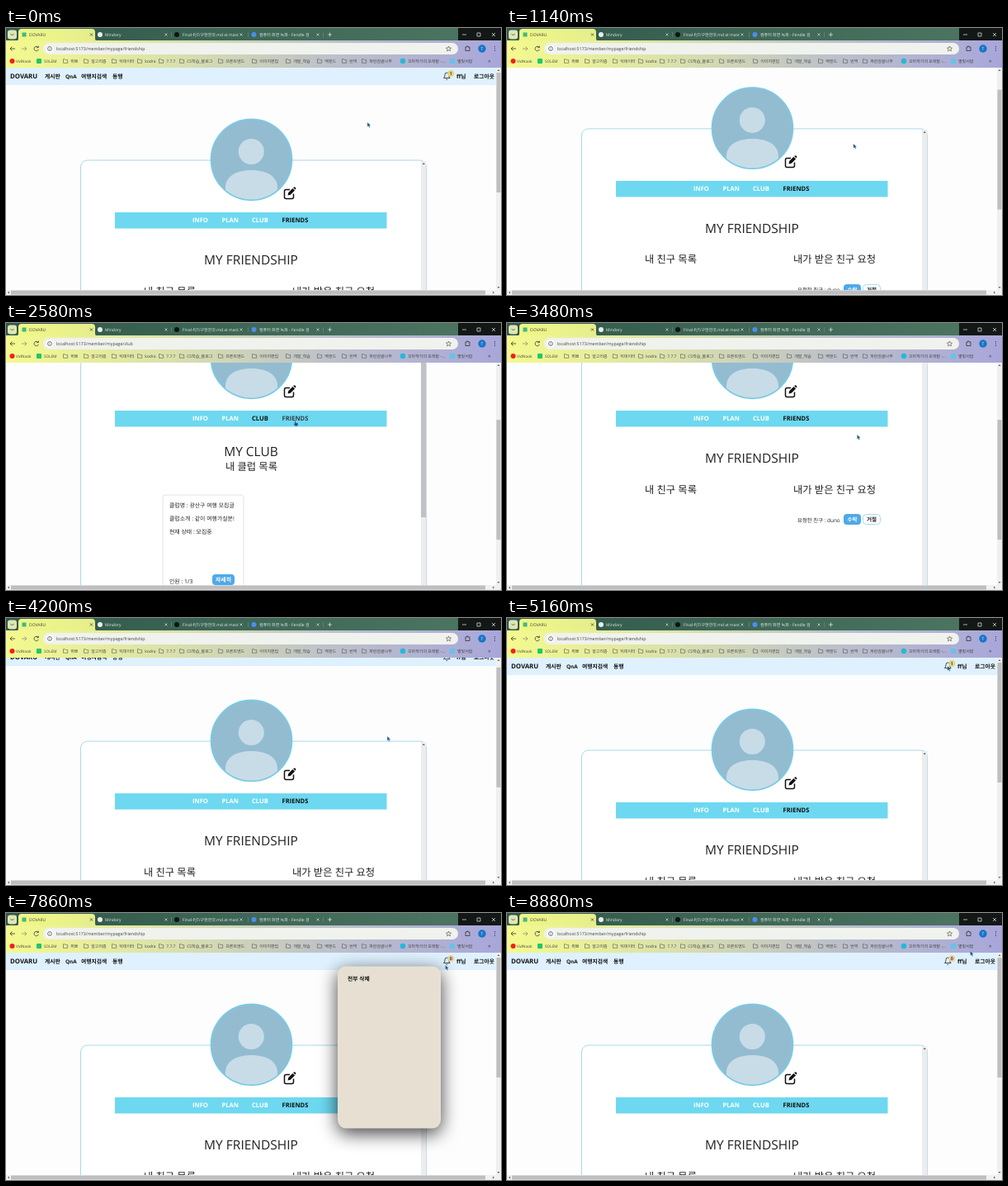
Animation, 600 px wide and 323 px high, one loop 8940 ms. Source, as an HTML page:

```html
<!DOCTYPE html>
<html lang="ko">
<head>
<meta charset="utf-8">
<style>
html, body { margin: 0; width: 100%; height: 100%; overflow: hidden; background: #fdfdfe; }
svg { display: block; width: 600px; height: 323px; }
text {
  font-family: "Open Sans", "Noto Sans CJK KR", "Noto Sans CJK JP", sans-serif;
  white-space: pre;
  text-rendering: geometricPrecision;
}
#panel rect { filter: drop-shadow(0 6px 11px rgba(0, 0, 0, .75)); }
</style>
</head>
<body>
<svg id="stage" viewBox="0 0 600 323"></svg>
<script>
const LOOP = 8940;
const $ = id => document.getElementById(id);

const text = (x, y, size, str, fill = '#222', weight = 400, extra = '') =>
  `<text x="${x}" y="${y}" font-size="${size}" fill="${fill}" font-weight="${weight}" ${extra}>${str}</text>`;
const rect = (x, y, w, h, fill, rx = 0, extra = '') =>
  `<rect x="${x}" y="${y}" width="${w}" height="${h}" fill="${fill}" rx="${rx}" ${extra}/>`;
const dot = (x, y, r, fill, extra = '') => `<circle cx="${x}" cy="${y}" r="${r}" fill="${fill}" ${extra}/>`;
const line = (d, stroke, width = .7, extra = '') =>
  `<path d="${d}" fill="none" stroke="${stroke}" stroke-width="${width}" ${extra}/>`;
const cross = (x, y, r, color) =>
  line(`M${x - r} ${y - r}l${2 * r} ${2 * r}M${x + r} ${y - r}l${-2 * r} ${2 * r}`, color);
const tri = (d, fill = '#666') => `<path d="${d}" fill="${fill}"/>`;

const folders = [[72, '취뽀'], [97, '알고리즘'], [131, '빅데이터'], [162, 'kodra'], [188, '7.7.7'],
  [213, 'CS학습_블로그'], [260, '프론트엔드'], [301, '이미지편집'], [342, '개발_학습'],
  [380, '백앤드'], [410, '번역'], [434, '파란감귤나무']];
const links = [['INFO', 226, 19], ['PLAN', 261.5, 21], ['CLUB', 298, 20], ['FRIENDS', 334.5, 33]];

function tabs() {
  const others = [[114, '#e8eeec', 120, 'Mindory', 194], [207, '#0d1512', 214, 'Final-PJT/구현한것.md at mast', 285],
    [300.5, '#4d8df0', 307, '컴퓨터 화면 녹화 - Fendle 검', 378]];
  return rect(0, 0, 600, 16, 'url(#strip)') + rect(548, 0, 52, 15, '#131816') +
    rect(2, 2.5, 11, 11, '#dfe6b4', 3) + line('M5.500 7l2 2l2 -2', '#333') +
    `<path d="M12 16q3 0 3 -4v-7q0 -4 4 -4h85q4 0 4 4v7q0 4 3 4z" fill="url(#tab)"/>` +
    rect(19.5, 5.5, 5, 5, '#41b883') + text(28, 10, 5, 'DOVARU', '#444') + cross(103.5, 8, 1.6, '#333') +
    others.map(([ix, color, tx, str, cx]) => dot(ix, 8, 3, color) +
      text(tx, 10, 5, str, '#e4ebe8') + cross(cx, 8, 1.5, '#d5ddda')).join('') +
    line('M200.500 5v6M293.500 5v6M384.500 5v6', '#7d998c', .5) +
    line('M390 8h5M392.500 5.500v5', '#e4ebe8') +
    line('M553 8h5M571 6h4v4h-4z', '#eee') + cross(591, 8, 2, '#eee');
}

function toolbar() {
  return rect(0, 15, 600, 33, 'url(#bar)') +
    line('M11 25h-6m2.500 -2.500l-2.500 2.500l2.500 2.500', '#333', .8) +
    line('M19 25h6m-2.500 -2.500l2.500 2.500l-2.500 2.500', '#8b906c', .8) +
    line('M39 23.500a2.700 2.700 0 1 0 .3 2.500M39.300 21.700v2h-2', '#333', .8) +
    rect(45, 18, 503, 14, '#f0f2ed', 7) + dot(53, 25, 4.6, '#fff') +
    dot(53, 25, 2.5, 'none', 'stroke="#444" stroke-width=".7"') + line('M53 24.500v2M53 23.300v.6', '#444', .6) +
    text(61, 27, 5.3, '', '#444', 400, 'id="url"') +
    line('M536.500 22l.9 2l2.200 .2l-1.700 1.500l.5 2.200l-1.900 -1.200l-1.900 1.200l.5 -2.200l-1.700 -1.500l2.200 -.2z', '#444', .6) +
    line('M557 23h1.500v-1h1.500v1h2v4.500h-5z', '#333', .8) +
    dot(577, 25, 4.7, '#1675c8') + text(577, 26.8, 5, 'T', '#fff', 400, 'text-anchor="middle"') +
    dot(592.5, 22.7, .6, '#333') + dot(592.5, 25, .6, '#333') + dot(592.5, 27.3, .6, '#333') +
    dot(7.5, 40, 3, '#f02020') + text(12, 41.8, 4.7, 'VidNook', '#444') +
    rect(37, 37, 6, 6, '#1fc76a', 1) + text(46, 41.8, 4.7, 'SOLEM', '#444') +
    folders.map(([x, str]) => line(`M${x - 2.5} 42.300v-4.600h2l.8 .9h2.400v3.700z`, '#555', .6) +
      text(x + 6.2, 41.8, 5, str, '#444')).join('') +
    dot(481, 40, 3.3, '#28b8d8') + text(487, 41.8, 5, '꼬마작가의 모래밭 -...', '#444') +
    rect(538, 37, 6, 6, '#62c4e8') + text(547, 41.8, 5, '별빛서랍', '#444') + text(584, 42, 7, '»', '#444');
}

function header() {
  const bold = (x, str, size = 6.8) => text(x, 61, size, str, '#111', 700);
  return rect(0, 48, 594, 21, '#dff1fe') + bold(5, 'DOVARU', 7.8) + bold(47, '게시판') + bold(72, 'QnA', 6.4) +
    bold(91, '여행지검색') + bold(129, '동행') + bold(546, 'ff님') + bold(567, '로그아웃') +
    line('M530.500 60.500q1.500 -1 1.500 -4q0 -2.500 2.300 -2.500t2.300 2.500q0 3 1.500 4zM533.300 62q1 1 2 0', '#222', .8) +
    dot(539.2, 55, 3.9, '#e5d27a', 'id="badge"') +
    text(539.2, 57, 5.4, '1', '#222', 600, 'text-anchor="middle" id="count"');
}

function profile() {
  return rect(90.5, 160, 419, 500, '#fff', 8, 'stroke="#9fd4e6" stroke-width=".9"') +
    rect(503, 161, 6.3, 400, '#ededee') + tri('M504.500 165l1.700 -2l1.700 2z') +
    `<clipPath id="round">${dot(297.5, 159.3, 49)}</clipPath><g clip-path="url(#round)">` +
    rect(247, 109, 101, 101, '#93bcd1') + dot(297.3, 149.5, 15.5, '#c8dce7') +
    '<path d="M266 210V192C267 178 281 172 297.500 172S328 178 329 192V210z" fill="#c8dce7"/></g>' +
    dot(297.5, 159.3, 49, 'none', 'stroke="#78cbe5" stroke-width="1.7"') +
    line('M344 195.500h-4.500q-2 0 -2 2v7q0 2 2 2h7q2 0 2 -2v-4', '#111', 1.5) +
    tri('M341.500 202.500l.7 -3.300l5.300 -5.300l2.600 2.600l-5.300 5.300zM348.200 193.200l.7 -.6q1 -.7 2 .3t.2 2l-.5 .7z', '#111') +
    rect(132, 223, 329.5, 19.5, '#6dd8f0') +
    links.map(([str, x]) => text(x, 234.7, 7.6, str, '#fff', 700, `id="${str}"`)).join('');
}

function friends() {
  return '<g id="friends">' + text(297, 286, 15.5, 'MY FRIENDSHIP', '#222', 400, 'text-anchor="middle"') +
    text(167, 322.5, 12.3, '내 친구 목록') + text(347, 322.5, 12.3, '내가 받은 친구 요청') +
    text(352, 357.5, 6.4, '요청한 친구 : duno') +
    rect(408, 348, 21, 13, '#4ea9e8', 4) + text(418.5, 357, 6.6, '수락', '#fff', 700, 'text-anchor="middle"') +
    rect(431.5, 348.5, 21, 12, '#fff', 4, 'stroke="#8fd3e8" stroke-width=".8"') +
    text(442, 357, 6.6, '거절', '#222', 700, 'text-anchor="middle"') + '</g>';
}

function club() {
  return '<g id="club">' + rect(503, 160, 6, 192, '#c1c1c3') +
    text(297, 277.5, 15.5, 'MY CLUB', '#222', 400, 'text-anchor="middle"') + text(266, 294.7, 12.3, '내 클럽 목록') +
    rect(190, 325, 98, 116, '#fff', 3, 'stroke="#dcdcde" stroke-width=".8"') +
    text(198, 339.5, 6.9, '클럽명 : 광산구 여행 모집글') + text(198, 355.5, 6.9, '클럽소개 : 같이 여행가실분!') +
    text(198, 371.5, 6.9, '현재 상태 : 모집중') + text(198, 432, 6.9, '인원 : 1/3') +
    rect(250, 421, 27, 13, '#4ea9e8', 4) + text(263.5, 430, 6.9, '자세히', '#fff', 700, 'text-anchor="middle"') + '</g>';
}

const panel = () => '<g id="panel">' + rect(402, 64.5, 125, 196, '#e7e0d2', 10) +
  text(414, 82.3, 6.8, '전부 삭제', '#111', 700) +
  text(414, 92.5, 6.8, 'duno님이 친구요청을 하였습니다', '#222', 400, 'id="note"') + '</g>';

const scrollbars = () => rect(594, 48, 6, 275, '#f0f0f1') + rect(594.5, 54, 5, 145, '#bebec0', 0, 'id="thumb"') +
  tri('M595.500 52l1.500 -2l1.500 2zM595.500 313l1.500 2l1.500 -2z') +
  rect(0, 317, 600, 6, '#f0f0f1') + rect(6, 317.5, 575, 5, '#bebec0') + tri('M4 318.500l-2 1.500l2 1.500zM590 318.500l2 1.500l-2 1.500z');

const gradient = (id, ...stops) => `<linearGradient id="${id}" gradientUnits="userSpaceOnUse" x1="0" x2="600">` +
  stops.map(([at, color]) => `<stop offset="${at}" stop-color="${color}"/>`).join('') + '</linearGradient>';

$('stage').innerHTML = gradient('strip', [0, '#30584a'], [.9, '#4a7360']) +
  gradient('tab', [0, '#f1f886'], [.18, '#e6ee8c']) +
  gradient('bar', [0, '#f4fa8c'], [.3, '#dde4a8'], [.65, '#bdc1c9'], [1, '#a8a6da']) +
  '<clipPath id="view"><path d="M0 48H594V317H0z"/></clipPath>' + rect(0, 0, 600, 323, '#fdfdfe') +
  `<g clip-path="url(#view)"><g id="page">${header()}${profile()}${friends()}${club()}${panel()}</g></g>` +
  scrollbars() + tabs() + toolbar() +
  `<g id="cursor"><path id="arrow" d="M0 0v5.500l1.300 -1.100l1 2l1 -.5l-.9 -1.900h1.700z" fill="#17577c" stroke="#d8eaf2" stroke-width=".3"/>
   <path id="hand" d="M0 0q.8 -.6 1.200 .4v2l2.300 .7q.8 .4 .5 1.600l-.6 2h-3l-1.900 -2.600q0 -.8 1.200 -.1z" fill="#17577c" stroke="#d8eaf2" stroke-width=".3"/></g>`;

// Rows of time followed by values
const scrollKeys = [[0, 0], [600, 0], [1140, 38], [2000, 117], [3700, 117], [4200, 11], [4300, 0], [LOOP, 0]];
const mouseKeys = [[0, 438, 114], [400, 438, 114], [1140, 420, 140], [2000, 308, 115], [2250, 308, 115],
  [2580, 350, 118], [2950, 350, 118], [3700, 455, 142], [4200, 462, 143], [5150, 534, 58], [5500, 534, 59],
  [6180, 485, 87], [6650, 425, 79], [7000, 425, 79], [7860, 532.5, 63], [8100, 534, 59], [8350, 534, 59],
  [8880, 561.5, 46], [LOOP, 561.5, 46]];

function at(keys, t) {
  const i = keys.findIndex(k => k[0] > t);
  const a = keys[i - 1], b = keys[i], p = (t - a[0]) / (b[0] - a[0]);
  return a.slice(1).map((v, j) => v + (b[j + 1] - v) * p);
}
const show = (id, on) => $(id).setAttribute('display', on ? 'inline' : 'none');

function draw(t) {
  const [scroll] = at(scrollKeys, t), [x, y] = at(mouseKeys, t);
  const onClub = t >= 2160 && t < 2760, open = t >= 5340 && t < 8280, read = t >= 5340;
  const inNote = open && x > 412 && x < 511 && y > 75 && y < 95;
  const current = onClub ? 'CLUB' : 'FRIENDS';
  let hover = '';
  for (const [name, left, width] of links) {
    const over = x >= left && x <= left + width && y + scroll > 225 && y + scroll < 240;
    if (over) hover = name;
    $(name).setAttribute('fill', name === current ? '#111' : over ? '#30434a' : '#fff');
  }
  $('page').setAttribute('transform', `translate(0 ${-scroll})`);
  $('thumb').setAttribute('y', 54 + scroll * .54);
  $('url').textContent = 'localhost:5173/member/mypage/' + (onClub ? 'club' : 'friendship');
  $('count').textContent = read ? '0' : '1';
  $('badge').setAttribute('fill', read ? '#eccfa6' : '#e5d27a');
  show('friends', !onClub);
  show('club', onClub);
  show('panel', open);
  show('note', t < 6840);
  show('hand', hover || inNote);
  show('arrow', !hover && !inNote);
  $('cursor').setAttribute('transform', `translate(${x} ${y})`);
}

function tick() {
  draw(performance.now() % LOOP);
  requestAnimationFrame(tick);
}
tick();
</script>
</body>
</html>
```
